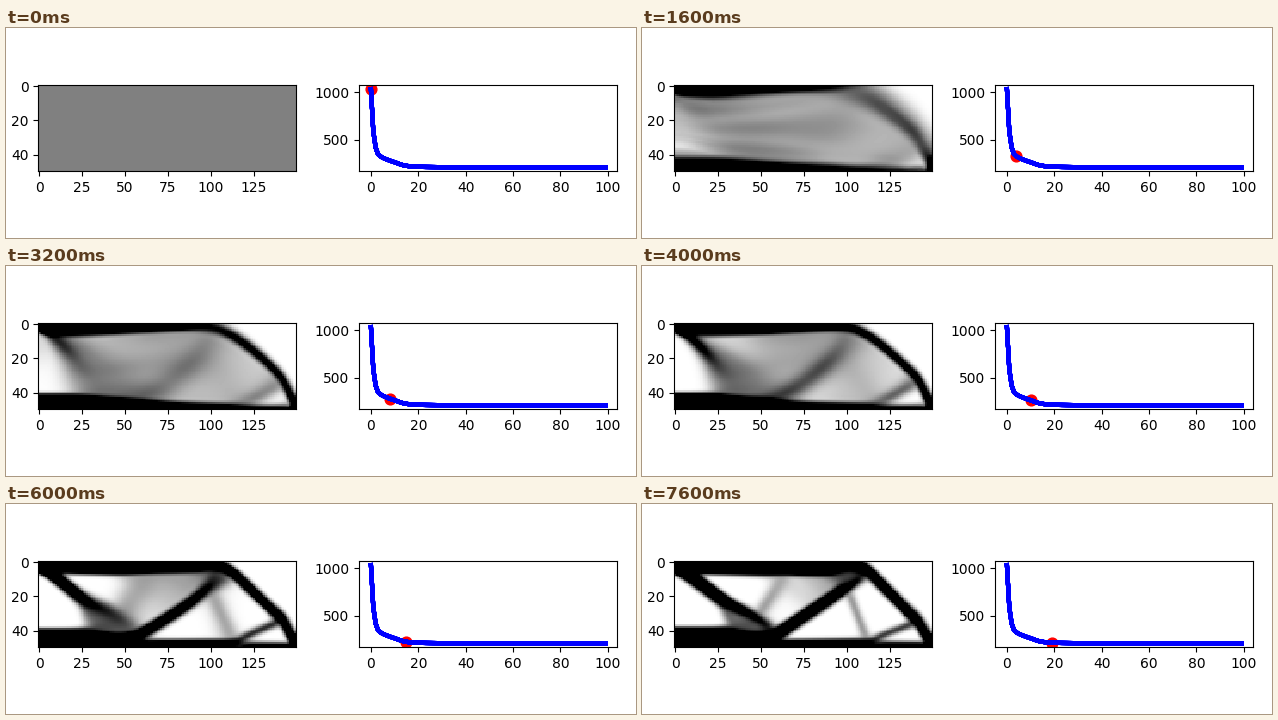
Animation of 630x210 px, one loop 8 s. Source, as a matplotlib script:

```python
"""Topology optimisation of a half beam, shown beside its compliance history."""
import numpy as np
import matplotlib.pyplot as plt
from matplotlib.animation import FuncAnimation

WIDTH, HEIGHT, DPI = 630, 210, 100
FRAMES, INTERVAL, HISTORY = 20, 400, 100
NX, NY = 150, 50
VOLUME, PENALTY, RADIUS, MOVE = 0.5, 3, 3.0, 0.2
E_MIN, POISSON = 1e-9, 0.3
COL = 2 * (NY + 1)  # degrees of freedom in one column of nodes


def element_stiffness(nu):
    k = np.array([1/2 - nu/6, 1/8 + nu/8, -1/4 - nu/12, -1/8 + 3*nu/8,
                  -1/4 + nu/12, -1/8 - nu/8, nu/6, 1/8 - 3*nu/8])
    order = ["01234567", "10765432", "27056341", "36507214",
             "45670123", "54321076", "63412705", "72143650"]
    return k[[[int(d) for d in row] for row in order]] / (1 - nu**2)


KE = element_stiffness(POISSON)
row = 2 * np.arange(NY)[:, None]
# Element dofs inside the slab between two neighbouring node columns
DOFS = row + np.array([2, 3, COL + 2, COL + 3, COL, COL + 1, 0, 1])


def solve(stiffness):
    """Displacements per node column, by block elimination from the right."""
    slab = np.zeros((NX, 2 * COL, 2 * COL))
    for i in range(8):
        for j in range(8):
            slab[:, DOFS[:, i], DOFS[:, j]] += stiffness * KE[i, j]
    diag = np.zeros((NX + 1, COL, COL))
    diag[:-1] += slab[:, :COL, :COL]
    diag[1:] += slab[:, COL:, COL:]
    symmetry = np.arange(0, COL, 2)
    diag[0, symmetry, symmetry] += 1e6
    diag[-1, -1, -1] += 1e6

    transfer = [None] * NX
    schur = diag[-1]
    for c in range(NX - 1, -1, -1):
        link = slab[c, :COL, COL:]
        transfer[c] = np.linalg.solve(schur, link.T)
        schur = diag[c] - link @ transfer[c]
    load = np.zeros(COL)
    load[1] = -1
    u = [np.linalg.solve(schur, load)]
    for t in transfer:
        u.append(-t @ u[-1])
    return np.array(u)


def cone_filter(a):
    reach = int(np.ceil(RADIUS)) - 1
    padded = np.pad(a, reach)
    total = np.zeros_like(a)
    for i in range(-reach, reach + 1):
        for j in range(-reach, reach + 1):
            weight = max(0, RADIUS - np.hypot(i, j))
            total += weight * padded[reach + i:reach + i + NX,
                                     reach + j:reach + j + NY]
    return total


WEIGHTS = cone_filter(np.ones((NX, NY)))


def analyse(x):
    """Compliance and filtered sensitivity."""
    stiffness = E_MIN + x**PENALTY * (1 - E_MIN)
    u = solve(stiffness)
    ue = np.hstack([u[:-1], u[1:]])[:, DOFS]
    energy = ((ue @ KE) * ue).sum(axis=2)
    slope = PENALTY * x**(PENALTY - 1) * energy
    slope = cone_filter(x * slope) / WEIGHTS / np.maximum(x, 1e-3)
    return (stiffness * energy).sum(), slope


def update(x, slope):
    """Optimality criteria step at constant volume."""
    low, high = 0, 1e9
    while (high - low) / (high + low) > 1e-4:
        mid = (low + high) / 2
        new = np.clip(x * np.sqrt(slope / mid), x - MOVE, x + MOVE).clip(0, 1)
        if new.mean() > VOLUME:
            low = mid
        else:
            high = mid
    return new


designs, costs = [], []
x = np.full((NX, NY), VOLUME)
for _ in range(FRAMES):
    cost, slope = analyse(x)
    designs.append(x)
    costs.append(cost)
    x = update(x, slope)

# The rest of the history settles slowly
steps = np.arange(HISTORY)
tail = costs[-1] * (0.975 + 0.025 * np.exp(-(steps[FRAMES:] - FRAMES + 1) / 10))
history = np.concatenate([costs, tail])

fig = plt.figure(figsize=(WIDTH / DPI, HEIGHT / DPI), dpi=DPI)


def panel(left):
    return fig.add_axes([left / WIDTH, 66.8 / HEIGHT, 258 / WIDTH, 86 / HEIGHT])


beam_ax, cost_ax = panel(32.2), panel(353.2)
beam = beam_ax.imshow(-designs[0].T, cmap="gray", vmin=-1, vmax=0,
                      aspect="auto", interpolation="nearest")
# Stacked copies of the curve harden its edges
for _ in range(FRAMES):
    cost_ax.plot(steps, history, color="blue", lw=3)
dot = cost_ax.scatter([0], [history[0]], s=60, color="red")


def draw(frame):
    beam.set_data(-designs[frame].T)
    dot.set_offsets([[frame, history[frame]]])
    return beam, dot


anim = FuncAnimation(fig, draw, frames=FRAMES, interval=INTERVAL, repeat=True)
plt.show()
```
